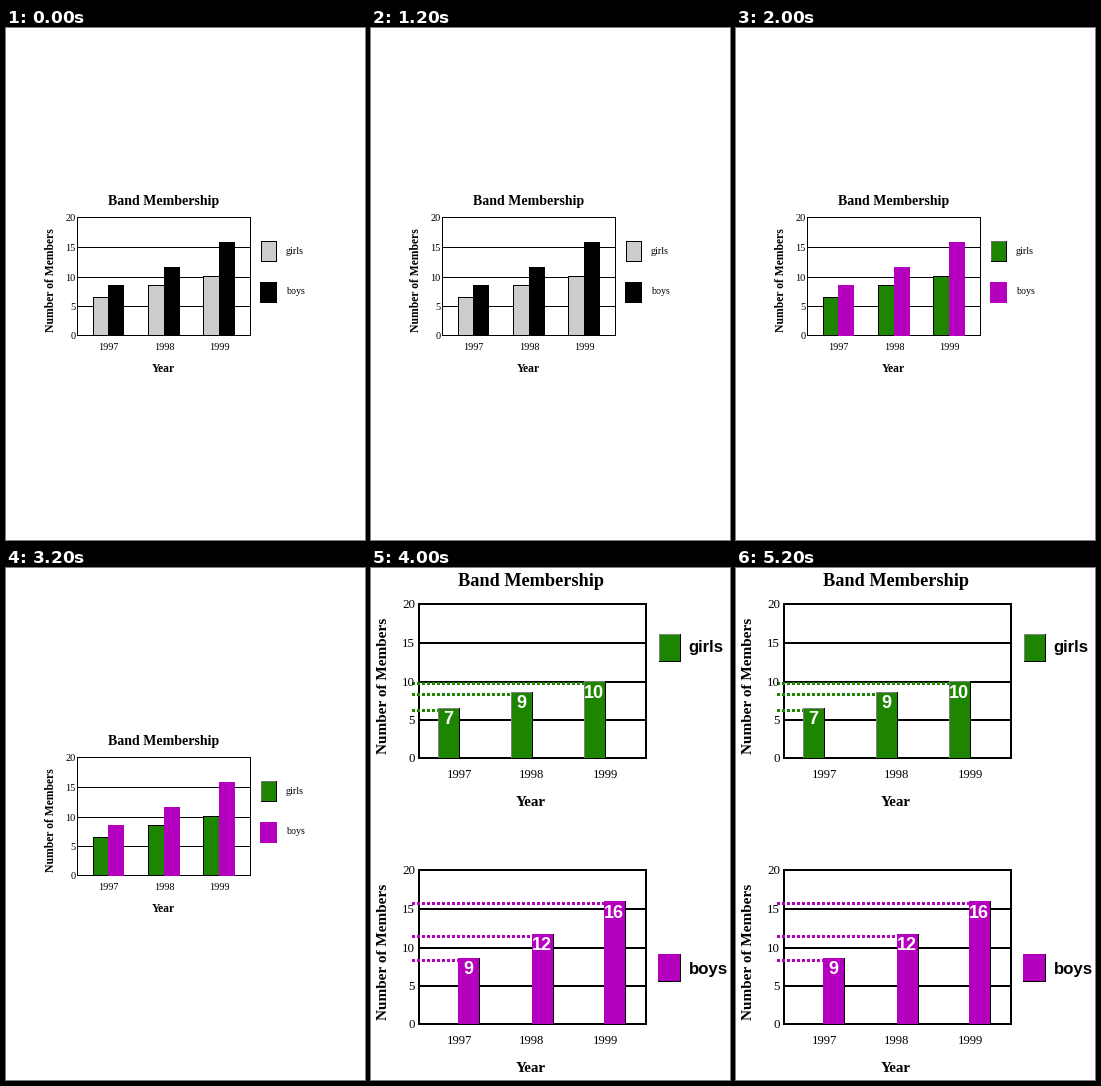
These frames come from a looping animation (359x512 px, 6 s). A matplotlib script:

```python
import matplotlib.pyplot as plt
from matplotlib.animation import ArtistAnimation
from matplotlib.patches import Rectangle

W, H, DPI = 359, 512, 64
GREEN, PURPLE, GRAY = "#1e8500", "#b400be", "#cccccc"
SERIF, SANS = "Liberation Serif", "Liberation Sans"
YEARS = ("1997", "1998", "1999")

fig = plt.figure(figsize=(W / DPI, H / DPI), dpi=DPI, facecolor="white")
ax = fig.add_axes([0, 0, 1, 1])
ax.set_xlim(0, W)
ax.set_ylim(H, 0)
ax.axis("off")


class Scene:
    """Collects the artists of one picture, in pixel coordinates."""

    def __init__(self):
        self.artists = []

    def box(self, x0, y0, x1, y1, color):
        patch = Rectangle((x0, y0), x1 - x0, y1 - y0, facecolor=color,
                          linewidth=0, antialiased=False,
                          zorder=1 + len(self.artists) * 0.01)
        self.artists.append(ax.add_patch(patch))

    def framed(self, x0, y0, x1, y1, fill, light, dark):
        """Filled box with light left/top and dark right/bottom edges."""
        self.box(x0, y0, x1, y1, dark)
        self.box(x0, y0, x1 - 1, y1 - 1, light)
        self.box(x0 + 1, y0 + 1, x1 - 1, y1 - 1, fill)

    def text(self, x, y, s, px, bold=False, ha="center", rotation=0,
             font=SERIF, color="black"):
        self.artists.append(ax.text(
            x, y, s, fontsize=px * 72 / DPI, family=font, color=color,
            weight="bold" if bold else "normal", ha=ha, va="baseline",
            rotation=rotation, rotation_mode="anchor", zorder=10))

    def grid(self, x0, x1, ys, thick):
        for y in ys:
            self.box(x0, y, x1, y + thick, "black")
        for x in (x0, x1 - thick):
            self.box(x, ys[0], x + thick, ys[-1] + thick, "black")

    def ticks(self, x, ys, drop, px):
        for value, y in zip((20, 15, 10, 5, 0), ys):
            self.text(x, y + drop, str(value), px, ha="right")

    def dots(self, x0, x1, y, color):
        for x in range(x0, x1, 5):
            self.box(x, y, min(x + 3, x1), y + 3, color)


def combined(colored):
    s = Scene()
    ys = (189, 219, 249, 278, 307)
    s.text(157.5, 177, "Band Membership", 13.9, bold=True)
    s.text(48, 252.5, "Number of Members", 11.6, bold=True, rotation=90)
    s.text(157.5, 344, "Year", 11.6, bold=True)
    s.grid(71, 245, ys, 1)
    s.ticks(69.5, ys, 4, 10.4)
    girls, boys = (GREEN, PURPLE) if colored else (GRAY, "black")
    bars = ((87, 102, 269, 257), (142, 158, 257, 239), (197, 213, 248, 214))
    for year, (x, mid, top_g, top_b) in zip(YEARS, bars):
        s.framed(x, top_g, mid + 1, 308, girls, "black", "black")
        s.box(mid, top_b, mid + 16, 308, boys)
        s.text(mid + 0.5, 322, year, 10.3)
    s.framed(255, 213, 271, 234, girls, "#707070" if colored else "black", "black")
    s.box(254, 254, 271, 275, boys)
    s.text(280, 226, "girls", 10, ha="left")
    s.text(280, 266, "boys", 10, ha="left")
    return s.artists


def panel(s, top, bars, color, light, dark):
    """One large chart with dotted guides; bars are (x, top, value)."""
    ys = [top + d for d in (0, 39, 78, 116, 154)]
    s.text(16, top + 82.5, "Number of Members", 15.2, bold=True, rotation=90)
    s.text(160, top + 203, "Year", 15, bold=True)
    s.grid(47, 276, ys, 2)
    s.ticks(44, ys, 5, 13)
    for x, y, value in bars:
        s.dots(41, x, y + 1, color)
        s.framed(x, y, x + 22, top + 156, color, light, dark)
        s.text(x + 10, y + 16.5, value, 18, bold=True, font=SANS, color="white")
    for x, year in zip((88.5, 160.5, 234), YEARS):
        s.text(x, top + 175, year, 12.8)


def separated():
    s = Scene()
    s.text(160, 18, "Band Membership", 18.2, bold=True)
    girls = (GREEN, "#808080", "black")
    boys = (PURPLE, PURPLE, "black")
    panel(s, 35, ((67, 140, "7"), (140, 124, "9"), (213, 113, "10")), *girls)
    panel(s, 301, ((87, 390, "9"), (161, 366, "12"), (233, 333, "16")), *boys)
    s.framed(288, 66, 310, 94, *girls)
    s.framed(287, 386, 310, 414, *boys)
    s.text(317, 84, "girls", 16.8, bold=True, ha="left", font=SANS)
    s.text(317.5, 406, "boys", 16.7, bold=True, ha="left", font=SANS)
    return s.artists


scenes = [combined(False), combined(True), separated()]
anim = ArtistAnimation(fig, scenes, interval=2000, repeat=True, repeat_delay=0)
plt.show()
```
